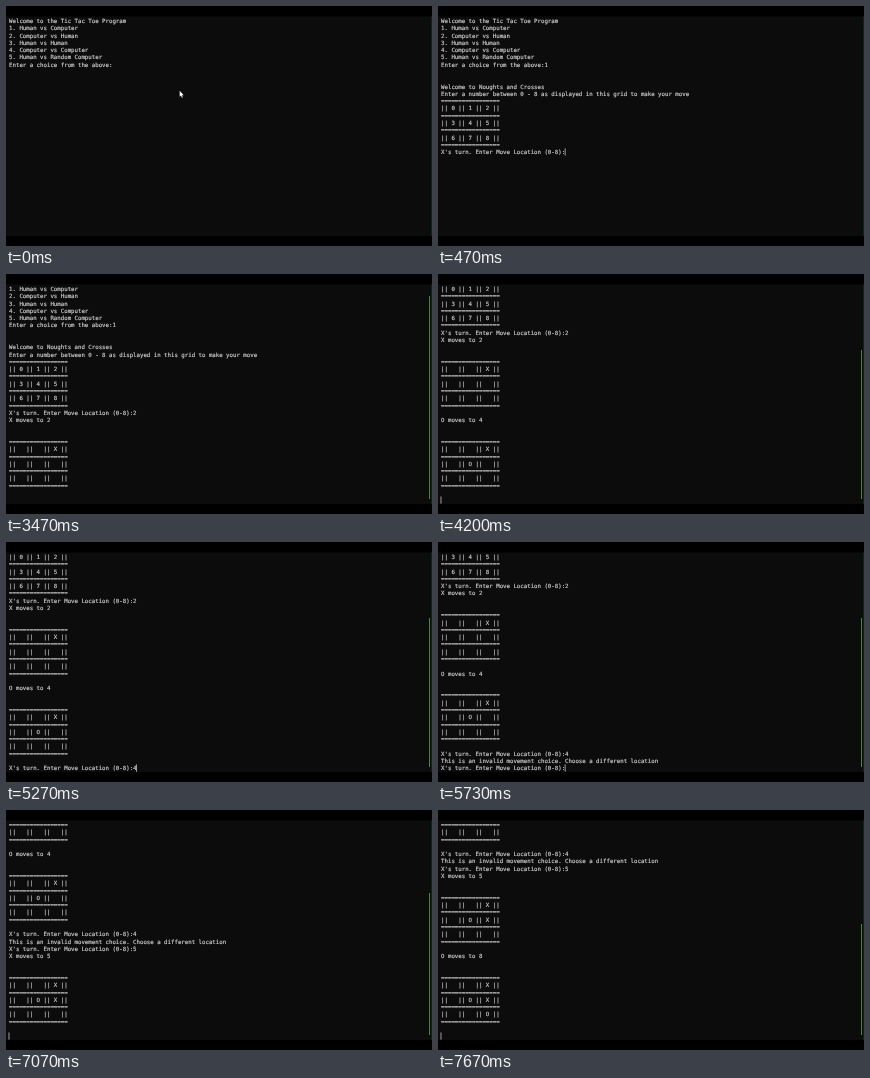
These frames come from a looping animation (426 by 240 pixels, 8 s). An HTML page with a canvas:

```html
<!DOCTYPE html>
<html lang="en">
<head>
<meta charset="utf-8">
<title>Tic Tac Toe terminal</title>
<style>
  html, body { margin: 0; width: 100%; height: 100%; overflow: hidden; background: #000; }
  canvas { display: block; width: 426px; height: 240px; }
</style>
</head>
<body>
<canvas id="stage" width="426" height="240"></canvas>
<script>
const ctx = document.getElementById("stage").getContext("2d");
const LOOP = 8000;
const ROWS = 30, CELL_W = 9, CELL_H = 19, BASELINE = 15;
const SCALE = 0.3831, LEFT = 3.06, TOP = 11.35;
const CARET_ON = 700, CARET_PERIOD = 1000, SCROLLBAR_LAG = 300;

// Every write appends to the terminal and keeps a snapshot of its lines.
const history = [];
let buffer = "";
function write(time, text) {
  buffer += text;
  history.push({ time, lines: buffer.split("\n") });
}

const RULE = "=".repeat(17);
function board(cells) {
  const rows = [0, 3, 6].map(i => `|| ${cells.slice(i, i + 3).join(" || ")} ||\n${RULE}`);
  return [RULE, ...rows].join("\n");
}

const cells = Array(9).fill(" ");
function move(who, n) {
  cells[n] = who;
  return `${who} moves to ${n}\n\n\n${board(cells)}\n\n`;
}

const PROMPT = "X's turn. Enter Move Location (0-8):";
const MENU = `Welcome to the Tic Tac Toe Program
1. Human vs Computer
2. Computer vs Human
3. Human vs Human
4. Computer vs Computer
5. Human vs Random Computer
Enter a choice from the above:`;
const INTRO = `


Welcome to Noughts and Crosses
Enter a number between 0 - 8 as displayed in this grid to make your move
${board([...cells.keys()])}
`;

write(-CARET_ON, MENU);
write(70, "1");
write(470, INTRO + PROMPT);
write(2470, "2");
write(2670, "\n" + move("X", 2));
write(3600, move("O", 4));
write(4730, PROMPT);
write(5270, "4");
write(5600, "\nThis is an invalid movement choice. Choose a different location\n" + PROMPT);
write(6870, "5");
write(7000, "\n" + move("X", 5));
write(7670, move("O", 8));

const stateAt = t => history.findLast(s => s.time <= t) || history[0];

function drawTerminal(t) {
  const { time, lines } = stateAt(t);
  const visible = lines.slice(-ROWS);

  ctx.save();
  ctx.translate(LEFT, TOP);
  ctx.scale(SCALE, SCALE);
  ctx.font = '14.95px "DejaVu Sans Mono", "Noto Sans Mono", monospace';
  ctx.textRendering = "geometricPrecision";
  ctx.fillStyle = ctx.strokeStyle = "#ccc";
  ctx.lineWidth = 0.45;
  visible.forEach((line, row) => {
    const y = row * CELL_H + BASELINE;
    ctx.fillText(line, 0, y);
    ctx.strokeText(line, 0, y);
  });
  if ((t - time) % CARET_PERIOD < CARET_ON) {
    const row = visible.length - 1;
    ctx.fillRect(visible[row].length * CELL_W - 1.2, row * CELL_H, 2, CELL_H);
  }
  ctx.restore();
}

function drawScrollbar(t) {
  const total = stateAt(t - SCROLLBAR_LAG).lines.length;
  if (total <= ROWS) return;
  const top = Math.round(15.5 + 213 * (total - ROWS) / total);
  ctx.fillStyle = "#4c824e";
  ctx.fillRect(423, top, 1, 225 - top);
}

function drawPointer() {
  const arrow = [[0, 0], [0, 6], [1.3, 4.8], [2.2, 7], [3.1, 6.6], [2.2, 4.5], [4, 4.4]];
  ctx.fillStyle = "#fff";
  ctx.beginPath();
  for (const [x, y] of arrow) ctx.lineTo(173.7 + x, 84.8 + y);
  ctx.fill();
}

function draw(t) {
  ctx.fillStyle = "#000";
  ctx.fillRect(0, 0, 426, 240);
  ctx.fillStyle = "#0c0c0c";
  ctx.fillRect(0, 10.5, 426, 219.5);
  ctx.fillStyle = "#0e260f";
  ctx.fillRect(425, 10.5, 1, 219.5);
  drawTerminal(t);
  drawScrollbar(t);
  if (t < 70) drawPointer();
}

function tick() {
  draw(performance.now() % LOOP);
  requestAnimationFrame(tick);
}
tick();
</script>
</body>
</html>
```
